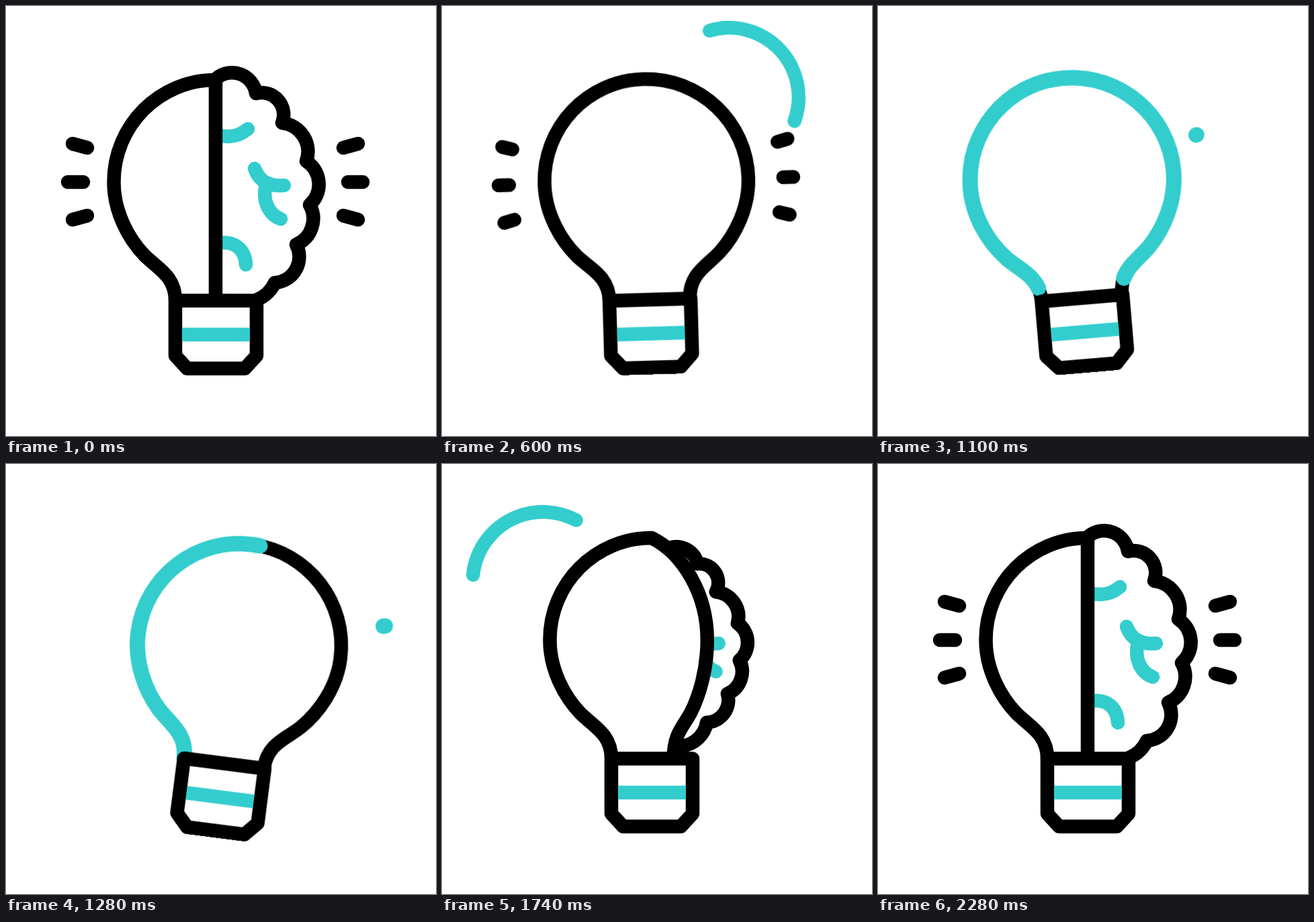
An HTML page without scripts that plays this animation: 640 by 640 pixels, repeating every 2.4 s.

```html
<!DOCTYPE html>
<html lang="en">
<head>
<meta charset="utf-8">
<title>Bulb and brain</title>
<style>
  :root { --sine: cubic-bezier(.37, 0, .63, 1); }
  html, body { margin: 0; width: 100%; height: 100%; overflow: hidden; background: #fff; }
  svg { display: block; width: 100%; height: 100%; }

  path {
    fill: none; stroke: #000; stroke-width: 20.5;
    stroke-linecap: round; stroke-linejoin: round;
    animation: 2.4s linear infinite both;
  }
  .solid { fill: #fff; }
  .cyan { stroke: #33cdcd; }
  .wide { stroke-width: 23; }
  .dash { stroke-dasharray: 100 300; }
  .band { stroke-linecap: butt; }

  #icon { transform-origin: 262px 540px; animation: tilt 2.4s var(--sine) infinite; }
  #folds { transform-origin: 400px 267px; animation: shrink 2.4s var(--sine) infinite; }
  #folds path { vector-effect: non-scaling-stroke; }
  #brain { animation-name: brain; animation-timing-function: var(--sine); }
  #bulb { animation-name: bulb; animation-timing-function: var(--sine); }
  #glow { stroke-dasharray: 95 305; animation-name: glow; }
  #arc-r { animation-name: arc-r; }
  #arc-l { animation-name: arc-l; }
  .ray { animation-name: ray; }
  .spark { animation-name: spark; animation-delay: var(--at); }

  @keyframes tilt {
    0%, 8.333% { transform: rotate(0deg); }
    20% { transform: rotate(-6deg); }
    33.333% { transform: rotate(8deg); }
    43.75% { transform: rotate(-6deg); }
    55% { transform: rotate(8deg); }
    66.667%, 100% { transform: rotate(0deg); }
  }
  @keyframes shrink {
    0%, 8.333%, 79.583%, 100% { transform: scale(1); }
    22.917%, 66.25% { transform: scale(.7); }
  }
  @keyframes brain {
    0%, 8.333%, 79.583%, 100% {
      d: path("M314 107A36 36 0 0 1 372 130A33 33 0 0 1 411 174A43 43 0 0 1 447 231A41 41 0 0 1 452 296A42 42 0 0 1 432 355A39 39 0 0 1 400 412A50 50 0 0 1 374 437");
    }
    22.917%, 66.25% {
      d: path("M362 139A29 29 0 0 1 387 164A24.5 24.5 0 0 1 405 204A32 32 0 0 1 434 242A30 30 0 0 1 435 289A31 31 0 0 1 419 331A29 29 0 0 1 389 362A36 36 0 0 1 345 405");
    }
  }
  @keyframes bulb {
    0%, 8.333%, 79.583%, 100% {
      d: path("M252 438C252 402 226 391 206 371C182 346 160.5 306 160.5 262C160.5 178 228 110 312 110C312 160 312 210 312 262C312 306 312 346 312 371C312 391 312 402 312 438");
    }
    21.667%, 66.25% {
      d: path("M252 438C252 402 226 391 206 371C182 346 160.5 306 160.5 262C160.5 178 228 110 312 110C396 110 464 178 464 262C464 306 442 346 418 371C398 391 372 402 372 438");
    }
  }
  @keyframes glow {
    0%, 29.167% { stroke-dashoffset: 98; }
    45.833% { stroke-dashoffset: -2.5; }
    62.083%, 100% { stroke-dashoffset: -102; }
  }
  @keyframes arc-r {
    0%, 9.583% { stroke-dashoffset: 102; }
    25%, 26.667% { stroke-dashoffset: 0; }
    37.5%, 100% { stroke-dashoffset: -102; }
  }
  @keyframes arc-l {
    0%, 61.833% { stroke-dashoffset: 102; }
    73.75%, 76.667% { stroke-dashoffset: 0; }
    90%, 100% { stroke-dashoffset: -102; }
  }
  @keyframes ray {
    0%, 20%, 95%, 100% { stroke-dashoffset: 0; }
    36.667%, 80.833% { stroke-dashoffset: -102; }
  }
  @keyframes spark {
    0% { stroke-dashoffset: 102; }
    4.167% { stroke-dashoffset: 0; }
    8.333%, 100% { stroke-dashoffset: -102; }
  }
</style>
</head>
<body>
<svg viewBox="0 0 640 640">
  <g id="icon">
    <path id="brain" d="M314 107A36 36 0 0 1 372 130A33 33 0 0 1 411 174A43 43 0 0 1 447 231A41 41 0 0 1 452 296A42 42 0 0 1 432 355A39 39 0 0 1 400 412A50 50 0 0 1 374 437"/>
    <g id="folds">
      <path class="cyan" d="M316 192Q341 199 360 183"/>
      <path class="cyan" d="M370 242Q380 270 414 267"/>
      <path class="cyan" d="M387 266C381 288 390 310 409 317"/>
      <path class="cyan" d="M316 353C340 349 356 362 357 385"/>
    </g>

    <path id="bulb" class="solid" d="M252 438C252 402 226 391 206 371C182 346 160.5 306 160.5 262C160.5 178 228 110 312 110V438"/>
    <path id="glow" class="cyan wide" pathLength="100" d="M372 438C372 402 398 391 418 371C442 346 464 306 464 262C464 178 396 110 312 110C228 110 160.5 178 160.5 262C160.5 306 182 346 206 371C226 391 252 402 252 438"/>

    <path class="solid" d="M252 438.5H373V520.5L355.5 539.5H269.5L252 520.5Z"/>
    <path class="cyan band" d="M262 489H363"/>

    <!-- rays run from the inner end outwards -->
    <path class="ray dash" pathLength="100" d="M121 211L99 205"/>
    <path class="ray dash" pathLength="100" d="M115 262H92"/>
    <path class="ray dash" pathLength="100" d="M121 312L99 318"/>
    <path class="ray dash" pathLength="100" d="M502 211L524 205"/>
    <path class="ray dash" pathLength="100" d="M509 262H531"/>
    <path class="ray dash" pathLength="100" d="M502 312L524 318"/>

    <path class="spark dash cyan wide" style="--at:1.38s" pathLength="100" d="M121 211L99 205"/>
    <path class="spark dash cyan wide" style="--at:1.372s" pathLength="100" d="M115 262H92"/>
    <path class="spark dash cyan wide" style="--at:1.38s" pathLength="100" d="M121 312L99 318"/>
    <path class="spark dash cyan wide" style="--at:1.096s" pathLength="100" d="M502 211L524 205"/>
    <path class="spark dash cyan wide" style="--at:1.38s" pathLength="100" d="M509 262H531"/>
    <path class="spark dash cyan wide" style="--at:1.325s" pathLength="100" d="M502 312L524 318"/>

    <path id="arc-r" class="dash cyan" pathLength="100" d="M535 179A103.5 103.5 0 0 0 412.6 40.8"/>
    <path id="arc-l" class="dash cyan" pathLength="100" d="M46.2 165A104.7 104.7 0 0 1 219 96.9"/>
  </g>
</svg>
</body>
</html>
```
